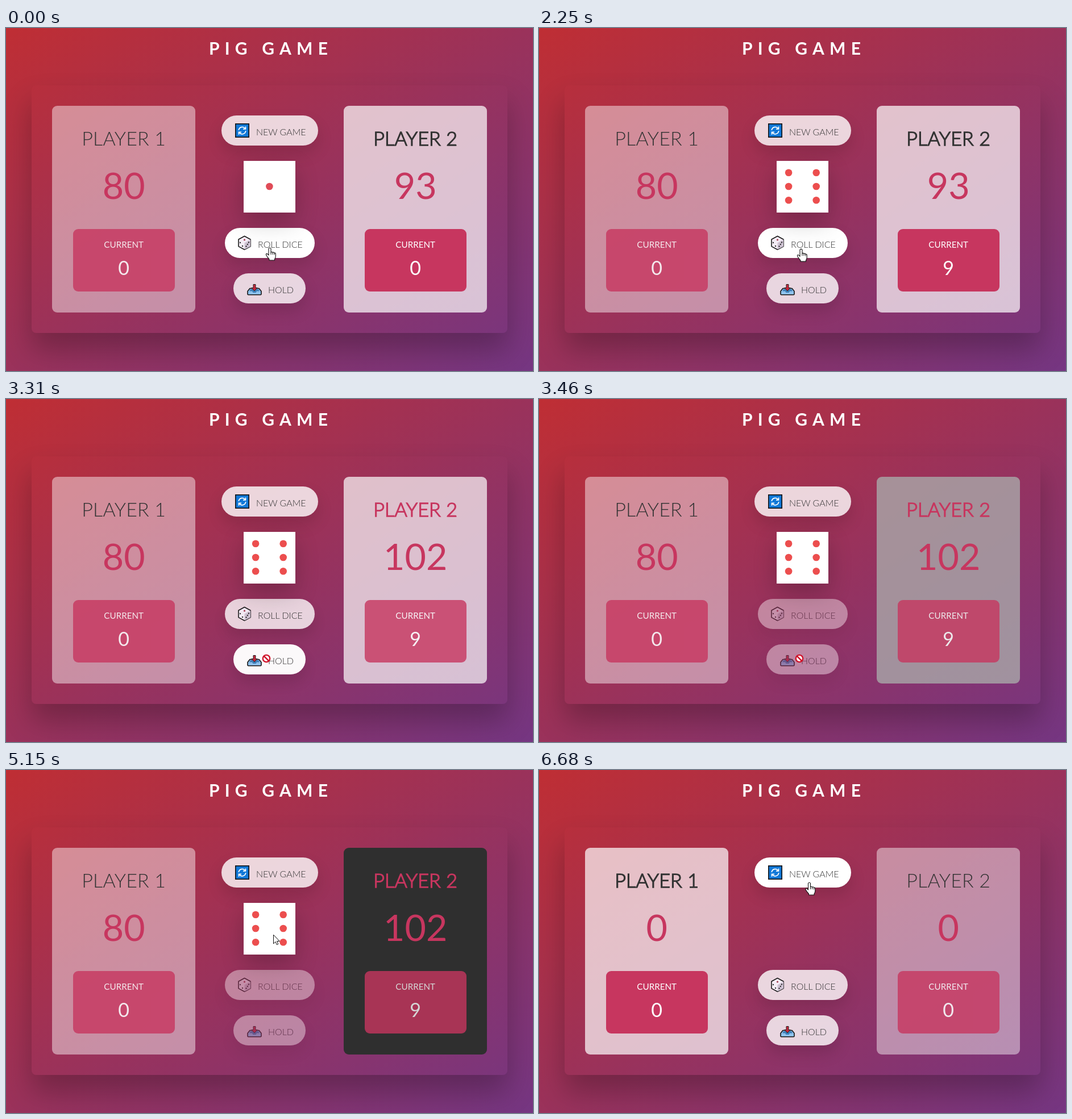
An HTML page that plays this animation: 927 px wide and 604 px high, repeating every 7080 ms.

```html
<!DOCTYPE html>
<html lang="en">
<head>
<meta charset="utf-8">
<title>Pig Game</title>
<style>
  html, body { margin: 0; width: 100%; height: 100%; overflow: hidden; }
  body { position: relative; background: linear-gradient(to top left, #753682, #bf2e34); }
  div, svg { position: absolute; }
  svg { width: 927px; height: 604px; overflow: visible; }
  text { font-family: Lato, "Open Sans", sans-serif; text-anchor: middle; }
  .title { font-size: 30px; font-weight: 700; letter-spacing: 9.2px; fill: #fff; text-anchor: start; }
  .name { font-size: 34px; font-weight: 300; letter-spacing: .2px; }
  .score { font-size: 64.5px; fill: #c7365f; }
  .label { font-size: 15.2px; fill: #fff; }
  .points { font-size: 34px; fill: #fff; }
  .caption { font-size: 16px; font-weight: 300; fill: #333; text-anchor: start; }
  .main { box-shadow: 0 30px 50px rgba(0, 0, 0, .25); }
  .current { background: #c7365f; }
  .button { box-shadow: 0 14px 28px rgba(0, 0, 0, .13); }
  .dice { background: #fff; box-shadow: 0 16px 40px rgba(0, 0, 0, .22); }
</style>
</head>
<body>
<script>
const LOOP = 7080;
const ROLLS = [200, 1090], HOLD = 3210, DISABLE = 3300, RESET = 5950, ENABLE = 6045;

// Places a rounded box whose inner SVG uses stage coordinates.
function box(className, x, y, w, h, radius, inner = '') {
  const el = document.createElement('div');
  el.className = className;
  el.style.cssText = `left:${x}px;top:${y}px;width:${w}px;height:${h}px;border-radius:${radius}px`;
  el.innerHTML = `<svg style="left:${-x}px;top:${-y}px">${inner}</svg>`;
  document.body.append(el);
  return el;
}
const text = (className, x, y, content) =>
  `<text class="${className}" x="${x}" y="${y}">${content}</text>`;

const refreshIcon = `
  <rect x="403.8" y="168.8" width="23.4" height="23.4" fill="#1279d8" stroke="#111" stroke-width="1.6"/>
  <g fill="none" stroke="#fff" stroke-width="1.7">
    <path d="M409.3 180A6.3 6.3 0 0 1 420.5 176.8M421.7 181A6.3 6.3 0 0 1 410.5 184.4"/>
    <path d="M421.5 173.5V177.8H417M409.5 187.7V183.4H414"/>
  </g>`;
const diceIcon = `
  <path d="M419.5 366.5L430 372.3V384.6L419.5 390.3L409 384.6V372.3Z" fill="#f4edf6" stroke="#1a1a1a" stroke-width="1.6" stroke-linejoin="round"/>
  <path d="M419.5 378.5L430 372.5V384.5L419.5 390Z" fill="#cfc3d4"/>
  <g fill="#333"><circle cx="419.5" cy="373" r="1.6" fill="#a33a50"/>
    <circle cx="412" cy="378" r="1.2"/><circle cx="416" cy="384" r="1.2"/>
    <circle cx="422.5" cy="384.5" r="1.2"/><circle cx="427" cy="377.5" r="1.2"/><circle cx="424.8" cy="381" r="1.2"/></g>`;
const trayIcon = `
  <path d="M429 458.5H445L449 463.5V468.5Q449 469.7 447.8 469.7H426.2Q425 469.7 425 468.5V463.5Z" fill="#8fc3ee" stroke="#151515" stroke-width="1.6" stroke-linejoin="round"/>
  <path d="M430 460H444L446 463.5H441L439.5 466H434.5L433 463.5H428Z" fill="#3d7fb8"/>
  <path d="M435 451.5H439V457.5H442.2L437 463L431.8 457.5H435Z" fill="#c9263c" stroke="#222" stroke-width="1"/>`;

box('main', 45, 101, 837, 436, 8, text('title', 357, 47, 'PIG GAME'));

function player(number, left) {
  const mid = left + 126;
  const panel = box('player', left, 137, 252, 363.5, 9,
    text('name', mid, 207, 'PLAYER ' + number) + text('score', mid, 301, ''));
  const current = box('current', left + 36.3, 354, 179.5, 110, 9,
    text('label', mid, 387.3, 'CURRENT') + text('points', mid, 434.5, ''));
  const find = (el, name) => el.querySelector('.' + name);
  return { panel, current, name: find(panel, 'name'), score: find(panel, 'score'), points: find(current, 'points') };
}
const first = player(1, 81.2), second = player(2, 594.2);

function button(x, y, w, icon, textX, caption) {
  return { top: y, bottom: y + 53,
    el: box('button', x, y, w, 53, 26.5, icon + text('caption', textX, y + 35, caption)) };
}
const newGame = button(379, 153.5, 170, refreshIcon, 440, 'NEW GAME');
const roll = button(384.5, 351.5, 158.5, diceIcon, 443, 'ROLL DICE');
const hold = button(400, 431.5, 127, trayIcon, 461, 'HOLD');

const dice = box('dice', 418, 233.5, 91, 91, 0);
const FACES = {
  1: [[0, 0]],
  3: [[-1, -1], [0, 0], [1, 1]],
  6: [-1, 1].flatMap(x => [-1, 0, 1].map(y => [x, y]))
};
const CURSORS = {
  arrow: '<path d="M.5 .5V16.2L4 12.8L6.3 18L8.8 17L6.5 11.8H11.2Z" fill="#fff" stroke="#111"/>',
  hand: `<path d="M-2 1.5Q0-1.5 2 1.5V8Q4 6.3 5 8.4Q7.2 7 8 9.4Q10.3 8.4 10.3 11V15Q10 18 8.5 19.8V22H-1V20Q-4.5 16.5-6.3 12.8Q-7.2 9.6-4.4 10.6L-2 13Z" fill="#fff" stroke="#111" stroke-width="1.1" stroke-linejoin="round"/>
    <path d="M2 8V12M5 8.5V12M8 9.5V12.5" stroke="#111"/>`,
  blocked: '<circle r="6.2" fill="#fff" stroke="#d0122a" stroke-width="2.3"/><path d="M-4.4-4.4L4.4 4.4" stroke="#d0122a" stroke-width="2.5"/>'
};
const cursor = box('cursor', 0, 0, 0, 0, 0, '<g></g>').querySelector('g');

// Cursor path: time, x, y.
const PATH = [
  [0, 464, 387], [2220, 464, 387], [2250, 461, 389], [2650, 458, 457], [4610, 458, 457],
  [5150, 470, 290], [5340, 472, 230], [5540, 475.5, 198], [LOOP, 475.5, 198]
];
const mix = (a, b, p) => a + (b - a) * p;
const clamp = v => Math.min(1, Math.max(0, v));

function cursorAt(t) {
  const i = PATH.findIndex(point => point[0] > t);
  const [from, to] = [PATH[i - 1], PATH[i]];
  const p = (t - from[0]) / (to[0] - from[0]);
  return [mix(from[1], to[1], p), mix(from[2], to[2], p)];
}

// The CSS "ease" curve.
function ease(p) {
  const curve = (s, a, b) => 3 * s * (1 - s) ** 2 * a + 3 * s * s * (1 - s) * b + s ** 3;
  let low = 0, high = 1;
  for (let i = 0; i < 18; i++) {
    const s = (low + high) / 2;
    if (curve(s, .25, .25) < p) low = s; else high = s;
  }
  return curve(low, .1, 1);
}
const progress = (t, start, duration) => t < start ? 0 : ease(clamp((t - start) / duration));

// Grey with alpha, mixed premultiplied.
function grey(from, to, p) {
  const alpha = mix(from[1], to[1], p);
  const level = mix(from[0] * from[1], to[0] * to[1], p) / alpha;
  return `rgba(${level},${level},${level},${alpha})`;
}
const ACTIVE = [255, .7], IDLE = [255, .45], WINNER = [47, 1];

function setPlayer(p, background, active, bold, color, score, points) {
  p.panel.style.background = background;
  p.current.style.opacity = active ? 1 : .8;
  p.name.style.cssText = `fill:${color};stroke:${color};stroke-width:${bold ? 1.4 : 0}`;
  p.score.textContent = score;
  p.points.textContent = points;
}
function setButton(b, hover, enabled) {
  b.el.style.background = `rgba(255,255,255,${mix(.8, 1, hover)})`;
  b.el.style.opacity = mix(.5, 1, enabled);
}

function draw(t) {
  const held = t >= HOLD, reset = t >= RESET;
  const won = held && !reset;
  const face = t < ROLLS[0] ? 1 : t < ROLLS[1] ? 3 : 6;
  const points = reset || face === 1 ? 0 : face === 3 ? 3 : 9;
  const back = progress(t, ENABLE, 750);

  setPlayer(first, grey(IDLE, ACTIVE, back), reset, reset, '#333', reset ? 0 : 80, 0);
  setPlayer(second,
    t < ENABLE ? grey(ACTIVE, WINNER, progress(t, DISABLE, 750)) : grey(WINNER, IDLE, back),
    !held, !reset, won ? '#c7365f' : '#333', reset ? 0 : held ? 102 : 93, points);

  const enabled = 1 - progress(t, DISABLE, 200) + progress(t, ENABLE, 200);
  setButton(newGame, progress(t, 5490, 200), 1);
  setButton(roll, 1 - progress(t, 2340, 200), enabled);
  setButton(hold, progress(t, 2500, 200) - progress(t, DISABLE, 200), enabled);

  dice.style.display = reset ? 'none' : '';
  dice.firstChild.innerHTML = FACES[face].map(([x, y]) =>
    `<circle cx="${463.4 + x * 24.3}" cy="${279 + y * 24.2}" r="6.3" fill="${face === 1 ? '#e04b57' : '#ec4e4e'}"/>`).join('');

  const [x, y] = cursorAt(t);
  const over = [newGame, roll, hold].find(b => y >= b.top && y <= b.bottom);
  const kind = !over ? 'arrow' : won && over !== newGame ? 'blocked' : 'hand';
  cursor.innerHTML = CURSORS[kind];
  cursor.setAttribute('transform', `translate(${x} ${y})`);
}

function frame() {
  draw(performance.now() % LOOP);
  requestAnimationFrame(frame);
}
frame();
</script>
</body>
</html>
```
